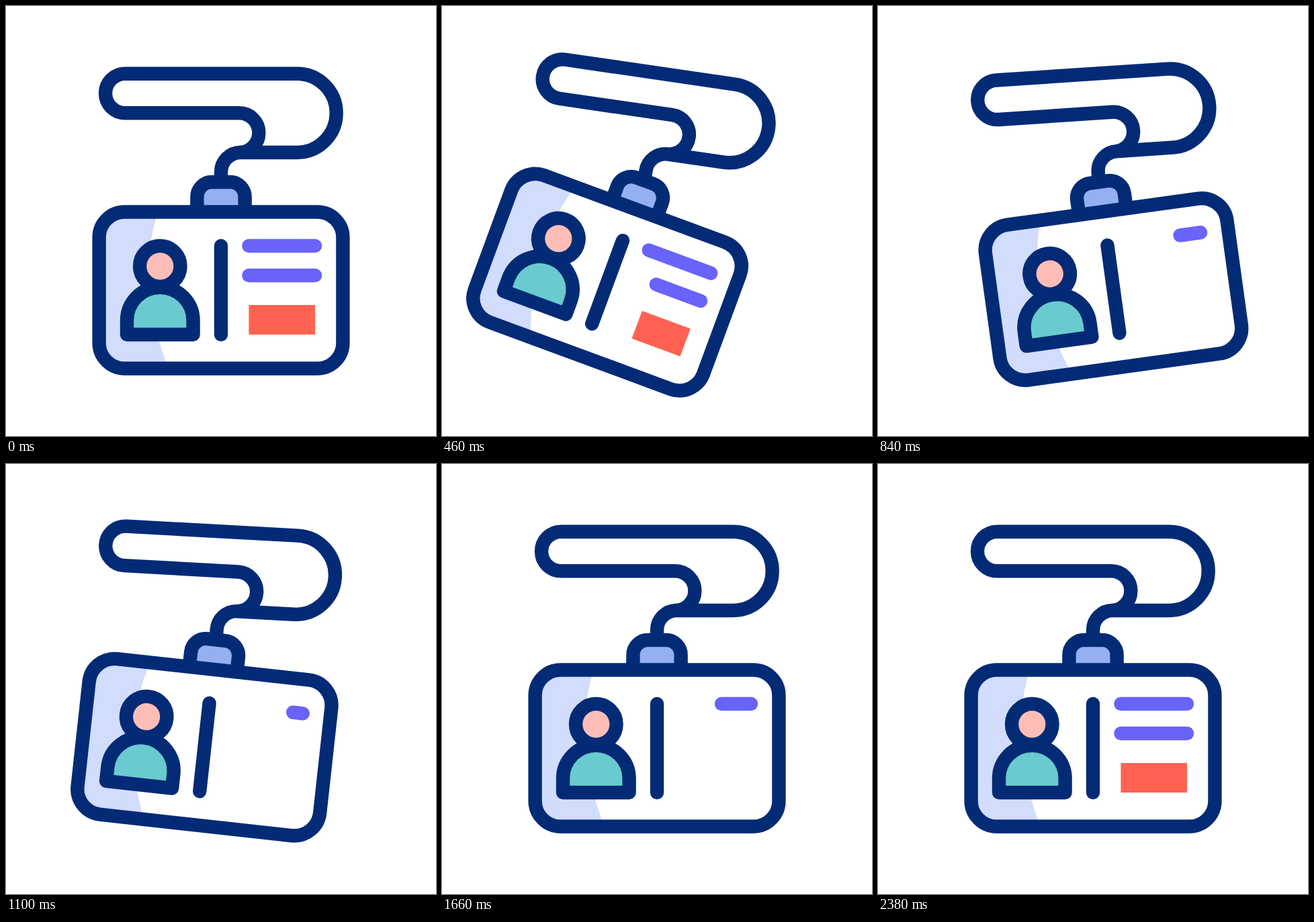
Animation of 640x640 px, one loop 2400 ms. Source, as an HTML page:

```html
<!DOCTYPE html>
<html lang="en">
<head>
<meta charset="utf-8">
<title>Swinging badge</title>
<style>
  html, body { margin: 0; width: 100%; height: 100%; overflow: hidden; background: #fff; }
  svg { display: block; width: 100vw; height: 100vh; }
  .ink { stroke: #032b75; stroke-width: 20.4; stroke-linecap: round; stroke-linejoin: round; fill: none; }
  .text { stroke: #6963fa; stroke-width: 20.4; stroke-linecap: round; }
</style>
</head>
<body>
<svg viewBox="0 0 640 640">
  <g id="strap">
    <path class="ink" style="stroke-linecap:butt" d="M320 266V247.3A29.3 29.3 0 0 1 349.3 218H433A58.65 58.65 0 0 0 433 100.7H177.3A29.3 29.3 0 0 0 177.3 159.3H347A29.35 29.35 0 0 1 347 218"/>
    <g id="card">
      <path class="ink" style="fill:#94b0f3" d="M284.4 306V284A22 22 0 0 1 306.4 262H333.6A22 22 0 0 1 355.6 284V306"/>
      <rect x="138.6" y="306.5" width="362.8" height="233" rx="38" fill="#fff"/>
      <path fill="#d2dcfd" d="M226 306.5H177A38 38 0 0 0 139 344.5V501.5A38 38 0 0 0 177 539.5H241.5L238 530C207 445 207 375 223 316Z"/>
      <rect class="ink" x="138.6" y="306.5" width="362.8" height="233" rx="38"/>
      <path class="ink" style="fill:#69cbcf" d="M180 489V468A49.3 49.3 0 0 1 278.6 468V489Z"/>
      <circle class="ink" style="fill:#ffbdb8" cx="229.3" cy="387.3" r="30.3"/>
      <path class="ink" d="M320 357V489"/>
      <line id="line1" class="text" x2="460" y1="357" y2="357"/>
      <line id="line2" class="text" x2="460" y1="401" y2="401"/>
      <line id="block" x2="460" y1="467" y2="467" stroke="#ff6251" stroke-width="44"/>
    </g>
  </g>
</svg>
<script>
  const LOOP = 2400, LEFT = 361.4, RIGHT = 460, WIPE = 500;
  const $ = id => document.getElementById(id);
  const strap = $('strap'), card = $('card');

  // Eased 0..1 progress between two times
  function ramp(t, from, to) {
    const p = Math.min(1, Math.max(0, (t - from) / (to - from)));
    return (1 - Math.cos(Math.PI * p)) / 2;
  }

  // Swing through successive peaks and settle at zero
  const turns = [705, 1042, 1280, 1510];
  function swing(t, start, top, peaks) {
    const times = [start, top, ...turns];
    let angle = 0;
    [...peaks, 0].forEach((peak, i) => {
      angle += (peak - (peaks[i - 1] || 0)) * ramp(t, times[i], times[i + 1]);
    });
    return angle;
  }

  // Each bar wipes away to the right, then grows back
  function wipe(id, t, erase, grow, rest) {
    const share = 1 - (1 - rest) * (ramp(t, erase, erase + WIPE) - ramp(t, grow, grow + WIPE));
    $(id).setAttribute('x1', RIGHT - (RIGHT - LEFT) * share);
    $(id).setAttribute('visibility', share > .004 ? 'visible' : 'hidden');
  }

  function draw(t) {
    const a = swing(t, 0, 364, [12, -8, 4, -2]);
    const b = swing(t, 16, 355, [30, -16.4, 8, -4]);
    strap.setAttribute('transform', `rotate(${a} 325 131)`);
    card.setAttribute('transform', `rotate(${b - a} 320 265)`);
    wipe('line1', t, 485, 1460, .15);
    wipe('line2', t, 282, 1670, 0);
    wipe('block', t, 305, 1840, 0);
  }

  const start = performance.now();
  function tick() {
    draw((performance.now() - start) % LOOP);
    requestAnimationFrame(tick);
  }
  draw(0);
  requestAnimationFrame(tick);
</script>
</body>
</html>
```
